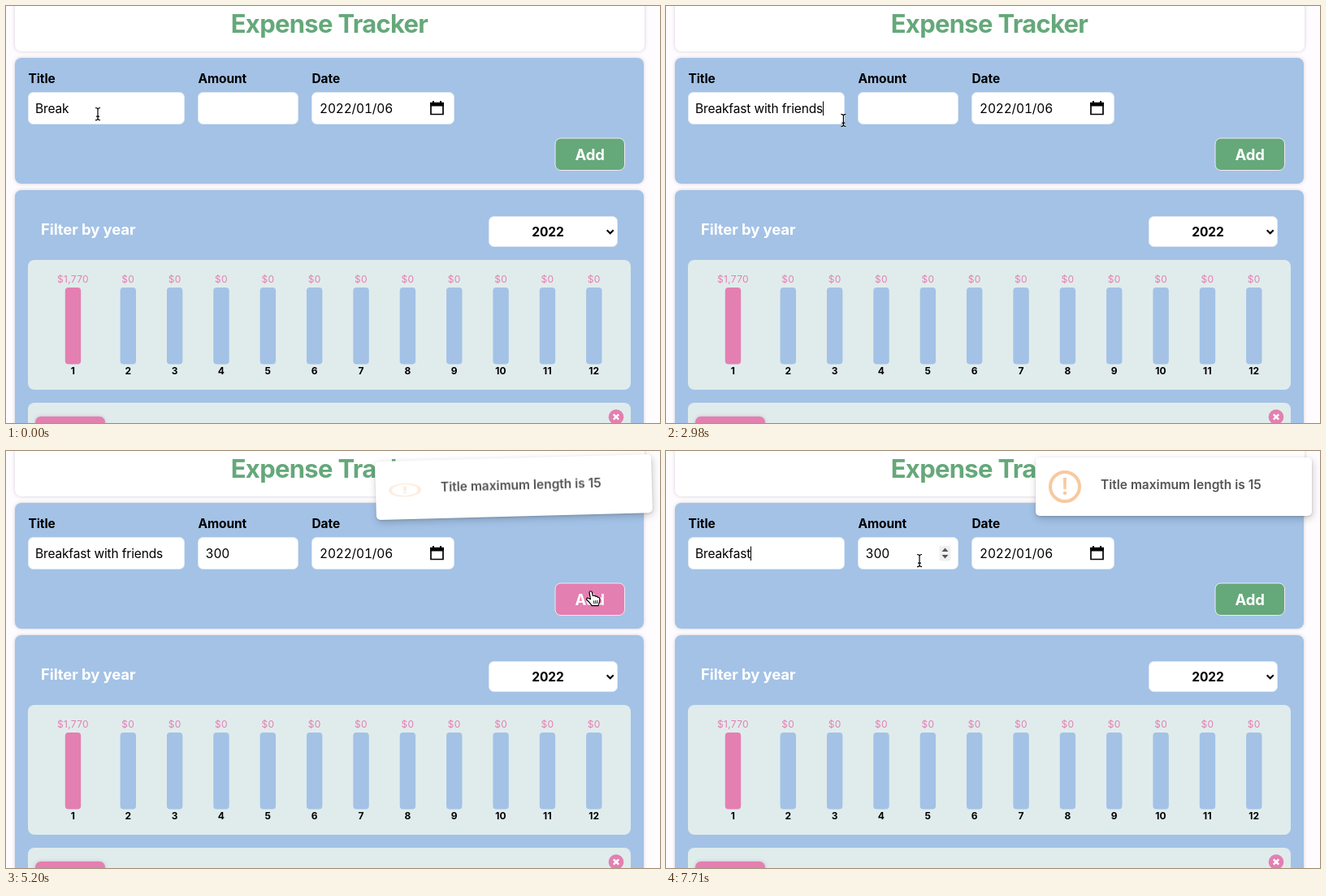
Write an HTML page that moves like this. It is 805 px wide and 514 px high and loops after 8000 ms.

```html
<!DOCTYPE html>
<html lang="en">
<head>
<meta charset="utf-8">
<title>Expense Tracker</title>
<style>
html, body { margin: 0; width: 100%; height: 100%; overflow: hidden; background: #fefcfe; }
svg { display: block; width: 805px; height: 514px; }
text { font: 400 15.5px Inter, "Open Sans", sans-serif; letter-spacing: -.15px; white-space: pre; }
.bold { font-weight: 700; letter-spacing: -.1px; }
.mid { text-anchor: middle; }
.head { font-size: 31px; letter-spacing: -.7px; fill: #65a87a; }
.big { font-size: 18.5px; fill: #fff; }
.sum { font-size: 12px; letter-spacing: .3px; fill: #e47fb1; }
.month { font-size: 12px; letter-spacing: .2px; }
.tab { font-variant-numeric: tabular-nums; }
.note { font-weight: 600; letter-spacing: 0; fill: #545454; }
.mark { font-size: 28px; font-weight: 600; fill: #f8c9a0; }
.card { filter: drop-shadow(0 0 2px rgba(90, 60, 90, .25)); }
#toast { filter: drop-shadow(0 1px 1px rgba(0, 0, 0, .14)) drop-shadow(1px 3px 5px rgba(0, 0, 0, .2)); }
</style>
</head>
<body>
<svg id="stage" viewBox="0 0 805 514" xmlns="http://www.w3.org/2000/svg"></svg>
<script>
const LOOP = 8000;
const BLUE = '#a3c2e6', PINK = '#e47fb1', GREEN = '#65a87a', MIST = '#e0ecec';
const TITLE = 'Breakfast with friends', AMOUNT = '300';
const stage = document.getElementById('stage');

function add(tag, attrs, parent = stage, text = '') {
  const el = document.createElementNS('http://www.w3.org/2000/svg', tag);
  for (const key in attrs) el.setAttribute(key, attrs[key]);
  el.textContent = text;
  return parent.appendChild(el);
}
const box = (x, y, width, height, rx, fill, more = {}, parent = stage) =>
  add('rect', { x, y, width, height, rx, fill, ...more }, parent);
const label = (x, y, text, cls = '', parent = stage) =>
  add('text', { x, y, class: cls }, parent, text);
const path = (d, more, parent = stage) => add('path', { d, fill: 'none', ...more }, parent);
const show = (el, on) => el.setAttribute('visibility', on ? 'visible' : 'hidden');

// page
box(11, -30, 775, 86, 8, '#fff', { class: 'card' });
label(398, 33, 'Expense Tracker', 'bold head mid');
box(11, 64, 774, 155, 8, BLUE, { class: 'card' });
box(11, 227, 774, 320, 8, BLUE, { class: 'card' });

// form
const edge = { stroke: '#dfe8f3' };
label(27.5, 95, 'Title', 'bold');
label(236.5, 95, 'Amount', 'bold');
label(376.5, 95, 'Date', 'bold');
box(27.5, 106.5, 192, 39, 6, '#fff', edge);
box(236.5, 106.5, 123, 39, 6, '#fff', edge);
box(376.5, 106.5, 175, 39, 6, '#fff', edge);
label(386, 132, '2022/01/06', 'tab');
path('M523 119.5h15v14h-15z', { stroke: '#000', 'stroke-width': 1.7 });
path('M522.2 119h16.6v4.5h-16.6zM525 117h2v3h-2zM534 117h2v3h-2z', { fill: '#000' });
const button = box(676, 163, 85.5, 39.5, 7, GREEN, { stroke: '#f1e9ef' });
label(718.7, 190, 'Add', 'bold big mid');

// filter and chart
label(43, 282, 'Filter by year', 'bold big');
box(594.5, 259.5, 158, 37, 6, '#fff', edge);
label(667, 284, '2022', 'bold mid');
path('M739.7 276.3l4 4 4-4', { stroke: '#000', 'stroke-width': 2 });
box(27, 313, 742, 160, 8, MIST);
for (let m = 1; m <= 12; m++) {
  const x = m === 1 ? 82.5 : 150.3 + (m - 2) * 57.35;
  label(x, 341, m === 1 ? '$1,770' : '$0', 'sum mid');
  box(x - 9.7, 347, 19.4, 94.5, 4, m === 1 ? PINK : BLUE);
  label(x, 454, m, 'bold month mid');
}
box(27, 489, 742, 60, 8, MIST);
box(36, 506, 86, 50, 7, PINK, { class: 'card' });
add('circle', { cx: 751, cy: 506.5, r: 9.3, fill: PINK });
path('M747.8 503.3l6.4 6.4m0-6.4l-6.4 6.4', { stroke: '#fff', 'stroke-width': 2.4 });

// editable parts
const mark = box(0, 117, 0, 19, 0, '#b3d7ff');
const title = label(36, 132, TITLE);
const amount = label(245.5, 132, '', 'tab');
const caret = box(0, 117.5, 1, 17.5, 0, '#000');
const spinner = add('g', {});
box(336.5, 117, 14, 18.5, 2, '#efefef', {}, spinner);
path('M339.5 124l4-4.5 4 4.5zM339.5 128l4 4.5 4-4.5z', { fill: '#555' }, spinner);

// toast
const toast = add('g', { id: 'toast' });
box(455, 8, 340, 72, 5, '#fff', {}, toast);
const icon = add('g', {}, toast);
add('circle', { r: 18, fill: 'none', stroke: '#f8c9a0', 'stroke-width': 4 }, icon);
const bang = label(0, 10, '!', 'mark mid', icon);
label(535, 47, 'Title maximum length is 15', 'note', toast);

// pointers
const pointer = add('g', {});
const shapes = {
  beam: add('g', {}, pointer), hand: add('g', {}, pointer), arrow: add('g', {}, pointer)
};
const beam = 'M-3-7.5q3 0 3 2.2 0-2.2 3-2.2M0-5.3V5.5M-3 7.7q3 0 3-2.2 0 2.2 3 2.2M-2 3.2h4';
path(beam, { stroke: '#fff', 'stroke-width': 2.6, opacity: .6 }, shapes.beam);
path(beam, { stroke: '#000', 'stroke-width': 1.2 }, shapes.beam);
path('M-2 1.3a1.7 1.7 0 0 1 3.3-.4L2.3 5.4q2.5-1.1 3.2.8 2.3-.6 2.9 1.1 2.4-.2 2.5 2.3 0 3.6-1.7 8H1.2Q-1.6 13.5-5.3 10.2-5.6 7.4-2.6 8.5L-.5 9.8z',
  { fill: '#fff', stroke: '#000', 'stroke-width': 1.2, 'stroke-linejoin': 'round' }, shapes.hand);
path('M3.4 11.5l.5 4M5.6 11.2l.3 4M7.8 11l.1 4', { stroke: '#000', 'stroke-width': .9 }, shapes.hand);
path('M0 0V15.5L3.6 12.2 6 17.8 8.6 16.7 6.2 11.2H11z',
  { fill: '#000', stroke: '#fff', 'stroke-width': 1.1 }, shapes.arrow);

// [time, number of characters]
const typing = [[0, 5], [140, 6], [290, 7], [440, 8], [740, 9], [890, 10], [1030, 11], [1180, 13],
  [1330, 15], [1780, 16], [1930, 17], [2080, 18], [2230, 19], [2380, 20], [2530, 21], [2680, 22], [7710, 9]];
const digits = [[0, 0], [3720, 1], [3870, 3]];
// [time, x, y]
const route = [[0, 113, 133], [2700, 113, 133], [2830, 165, 146], [2980, 218, 141], [3130, 275, 120],
  [3280, 312, 132], [4180, 312, 132], [4320, 480, 116], [4460, 725, 159], [4760, 720, 173],
  [5500, 720, 173], [5640, 520, 160], [5780, 290, 138], [5930, 130, 136], [6220, 94, 133],
  [6400, 94, 133], [6520, 106, 133], [6670, 150, 134], [6810, 210, 135], [6960, 266, 135], [7110, 312, 135]];
// [ms after opening, shift, angle]
const wobble = [[0, -10, 2], [165, 0, -2], [330, 5, 2], [500, 0, 0]];
const swing = [[0, 45], [125, -25], [250, 15], [375, -5], [500, 0]];
const TOAST_AT = 5000;

const within = (t, a, b) => t >= a && t < b;
const step = (keys, t) => keys.filter(k => k[0] <= t).pop()[1];
const smooth = u => u * u * (3 - 2 * u);
function track(keys, t, ease = u => u) {
  const i = keys.findIndex(k => k[0] > t);
  if (i < 0) return keys[keys.length - 1].slice(1);
  const a = keys[i - 1], b = keys[i], u = ease((t - a[0]) / (b[0] - a[0]));
  return a.slice(1).map((v, n) => v + (b[n + 1] - v) * u);
}

function drawFields(t, x, inAmount) {
  title.textContent = TITLE.slice(0, step(typing, t));
  amount.textContent = AMOUNT.slice(0, step(digits, t));
  const titleCaret = within(t, 140, 3430) || t >= 7710;
  const amountCaret = within(t, 3430, 4320) || within(t, 4840, TOAST_AT);
  const end = titleCaret ? 36 + title.getComputedTextLength()
    : 245.5 + (amount.textContent ? amount.getComputedTextLength() : 0);
  caret.setAttribute('x', Math.round(end));
  show(caret, titleCaret || amountCaret);

  const selecting = within(t, 6520, 7710);
  show(mark, selecting);
  if (selecting) {
    const from = 36 + title.getSubStringLength(0, 9);
    const to = Math.min(x, 36 + title.getComputedTextLength());
    mark.setAttribute('x', from);
    mark.setAttribute('width', Math.max(0, to - from));
  }
  show(spinner, within(t, 3430, TOAST_AT) || (inAmount && !within(t, 6450, 7050)));
}

function drawToast(t) {
  const age = t - TOAST_AT;
  show(toast, age >= 0);
  if (age < 0) return;
  const [dy, turn] = track(wobble, age, smooth);
  toast.setAttribute('transform', `translate(0 ${dy}) rotate(${turn} 625 44)`);
  const open = smooth(Math.min(1, age / 500));
  const tilt = Math.cos((1 - open) * 100 * Math.PI / 180);
  icon.setAttribute('transform', `translate(491 44) scale(1 ${tilt})`);
  icon.setAttribute('opacity', open);
  bang.setAttribute('transform', `rotate(${track(swing, age, smooth)[0]})`);
}

function draw(t) {
  const [x, y] = track(route, t);
  const inRow = within(y, 106, 146);
  const inAmount = inRow && within(x, 236, 360);
  const inField = inAmount || (inRow && (within(x, 27, 220) || within(x, 376, 552)));
  const onButton = within(x, 676, 762) && within(y, 163, 203);
  const kind = inField || t > 6450 ? 'beam' : onButton ? 'hand' : 'arrow';
  for (const name in shapes) show(shapes[name], name === kind);
  pointer.setAttribute('transform', `translate(${x} ${y})`);
  button.setAttribute('fill', onButton ? PINK : GREEN);
  drawFields(t, x, inAmount);
  drawToast(t);
}

const start = performance.now();
function tick() {
  draw((performance.now() - start) % LOOP);
  requestAnimationFrame(tick);
}
tick();
</script>
</body>
</html>
```
